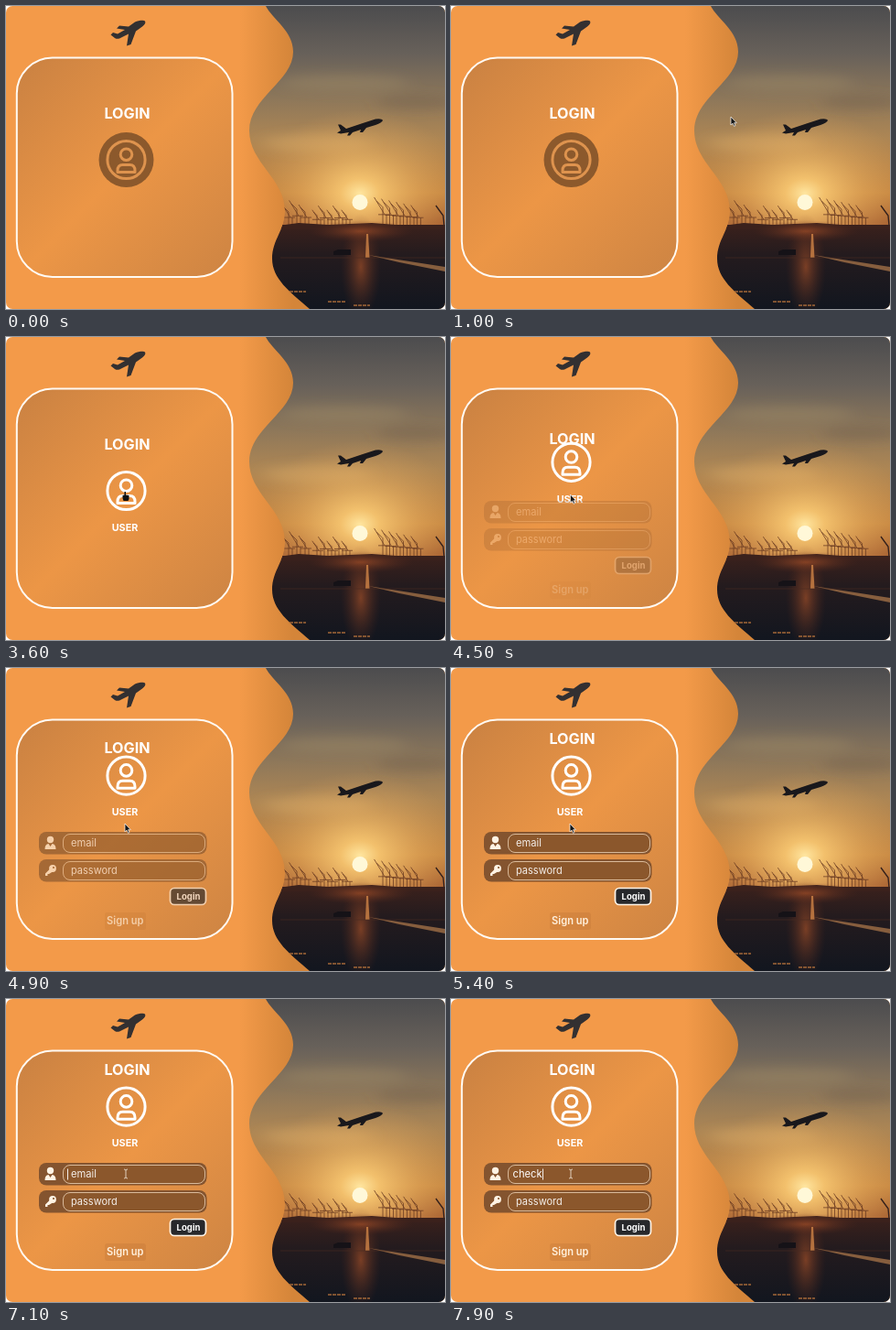
Animation of 480x331 px, one loop 8 s. Source, as an HTML page:

```html
<!DOCTYPE html>
<html lang="en">
<head>
<meta charset="utf-8">
<title>Login</title>
<style>
  html, body { margin: 0; width: 100%; height: 100%; overflow: hidden; background: #fff; }
  svg { display: block; width: 100vw; height: 100vh; }
  text { font-family: Inter, "Open Sans", sans-serif; fill: #fff; }
  .line { fill: none; stroke: currentColor; stroke-width: 3; }
</style>
</head>
<body>
<svg viewBox="0 0 480 331" xmlns="http://www.w3.org/2000/svg">
  <defs>
    <clipPath id="page"><rect width="480" height="331" rx="7"/></clipPath>
    <clipPath id="wave"><path d="M284 0C291 14 314 27 314 50C314 82 266 100 266 136C266 172 305 188 305 224C305 245 291 255 291 276C291 298 310 312 332 331H480V0Z"/></clipPath>
    <linearGradient id="panel" gradientUnits="userSpaceOnUse" x1="256" x2="314">
      <stop stop-color="#f39a49"/><stop offset="1" stop-color="#d48539"/>
    </linearGradient>
    <linearGradient id="card" x1="0" y1="0" x2="1" y2="1">
      <stop stop-color="#c98142"/><stop offset=".5" stop-color="#ec9646"/><stop offset="1" stop-color="#cd8443"/>
    </linearGradient>
    <linearGradient id="sky" x1="0" y1="0" x2="0" y2="1">
      <stop stop-color="#4c4c4e"/><stop offset=".22" stop-color="#68615a"/>
      <stop offset=".42" stop-color="#8d775a"/><stop offset=".6" stop-color="#ad8654"/>
      <stop offset=".85" stop-color="#c5853f"/><stop offset="1" stop-color="#a1592d"/>
    </linearGradient>
    <linearGradient id="ground" x1="0" y1="0" x2="0" y2="1">
      <stop stop-color="#3b211c"/><stop offset=".35" stop-color="#241b1e"/><stop offset="1" stop-color="#12161f"/>
    </linearGradient>
    <radialGradient id="glow">
      <stop stop-color="#ffe6a0"/><stop offset=".18" stop-color="#fbcb74" stop-opacity=".85"/>
      <stop offset=".55" stop-color="#edb463" stop-opacity=".45"/><stop offset="1" stop-color="#d8a05a" stop-opacity="0"/>
    </radialGradient>
    <radialGradient id="shine">
      <stop stop-color="#b6572a" stop-opacity=".8"/><stop offset="1" stop-color="#5c2a1c" stop-opacity="0"/>
    </radialGradient>
    <filter id="soft" x="-30%" y="-100%" width="160%" height="300%"><feGaussianBlur stdDeviation="9 6"/></filter>
  </defs>

  <g clip-path="url(#page)">
    <rect width="480" height="331" fill="url(#panel)"/>

    <g clip-path="url(#wave)">
      <rect x="260" width="220" height="240" fill="url(#sky)"/>
      <g filter="url(#soft)">
        <ellipse cx="370" cy="84" rx="70" ry="9" fill="#a18c69" opacity=".4"/>
        <ellipse cx="450" cy="105" rx="45" ry="9" fill="#6c5c49" opacity=".35"/>
        <ellipse cx="340" cy="150" rx="60" ry="10" fill="#d9ac68" opacity=".45"/>
      </g>
      <ellipse cx="387" cy="205" rx="118" ry="92" fill="url(#glow)"/>
      <circle cx="387" cy="214.500" r="8.500" fill="#fff8d8"/>
      <path id="cranes" fill="none" stroke="#6a3a22" stroke-width=".9" opacity=".85"/>
      <rect x="260" y="239" width="220" height="92" fill="url(#ground)"/>
      <path d="M290 241L320 237L352 239L400 237L440 240H480V244H290Z" fill="#3b211c"/>
      <ellipse cx="388" cy="246" rx="58" ry="12" fill="url(#shine)" opacity=".8"/>
      <ellipse cx="388" cy="285" rx="22" ry="58" fill="url(#shine)" opacity=".75"/>
      <path d="M470 218L478 229L479 240" fill="none" stroke="#35211c" stroke-width="1.400"/>
      <path d="M394 249H396L397.500 275H393Z" fill="#d98a48" opacity=".75"/>
      <path d="M396 272L480 285V290L430 280Z" fill="#a97549" opacity=".75"/>
      <path d="M300 275H480" stroke="#4a2d22" opacity=".6"/>
      <path d="M358 272V268L363 266H377V272Z" fill="#151217"/>
      <path d="M305 312H328M352 323H372M380 327H398" stroke="#b8743c" stroke-width="1.800" stroke-dasharray="4 1" opacity=".65"/>
      <path d="M363 129.500H366L372 134L390 128L404 123.500Q411 122.500 412 125Q411 127.500 404 130L394 133L390 138H387L388 135L379 138L376 141.500H373L375 138L366 139.500L362 138.500L366 136Z" fill="#19181c"/>
    </g>

    <path d="M152 16.500C151 15 145 15.500 141 17.500L134 22.500L124 21.500L121 24.500L130 26L122 30.500L117 29L114.500 31.500L119 35C120.500 36 122 36 124 35.500L134 30.500L132 43.500L136.500 42L142 27.500L149 22.500C152 20 153 18.500 152 16.500Z" fill="#333031"/>
    <rect x="11.800" y="56.600" width="235.700" height="239.400" rx="39" fill="url(#card)" stroke="#fffaf3" stroke-width="2"/>

    <text id="title" x="132.500" text-anchor="middle" font-size="16.200" font-weight="700">LOGIN</text>

    <g id="badge">
      <circle id="disc" r="30"/>
      <g id="person">
        <circle class="line" r="20.600"/>
        <circle class="line" cy="-5.800" r="6.300"/>
        <path class="line" stroke-linejoin="round" d="M-9.500 13.500V12Q-9.500 5.500-4 5.500H4Q9.500 5.500 9.500 12V13.500Z"/>
      </g>
      <text id="role" x="-1.500" y="43.800" text-anchor="middle" font-size="10.800" font-weight="700">USER</text>
    </g>

    <g id="form">
      <g id="rows"></g>
      <g fill="#fff3e4">
        <circle cx="48.500" cy="187.500" r="3.700"/>
        <path d="M42.500 198Q42.500 192.500 46.500 192L48.500 195L50.500 192Q54.500 192.500 54.500 198Z"/>
        <circle cx="51" cy="219" r="3.900"/>
        <path d="M48 219.500L51 222.500L47 225H45.500V227H43V224.500Z"/>
        <circle cx="52" cy="218" r="1.100" fill="#85562f"/>
      </g>
      <text id="email" y="195.300" font-size="11.200"></text>
      <text x="71" y="225.300" font-size="11" opacity=".9">password</text>
      <rect x="179.500" y="240.500" width="39" height="18" rx="4.500" fill="#27282b" stroke="#fff5e9" stroke-width="1.700"/>
      <text x="199.500" y="253" text-anchor="middle" font-size="9.600" font-weight="700">Login</text>
      <rect x="108" y="267" width="45" height="19" rx="3" fill="#9a5b25" opacity=".16"/>
      <text x="130.300" y="280.300" text-anchor="middle" font-size="11.100" font-weight="600" style="fill:#fff0dc">Sign up</text>
      <rect id="caret" y="185.500" width=".9" height="12" fill="#fff"/>
    </g>

    <g id="pointer">
      <path id="arrow" d="M0 0V9L2 7.200L3.500 10.300L5 9.600L3.600 6.700H6.300Z" fill="#151515" stroke="#fff" stroke-width=".7"/>
      <path id="hand" d="M-3.500-1L-1.500-1.500V-5H0V-1.500L3.500-1V3L2.500 5H-2.500L-3.500 2Z" fill="#111"/>
      <path id="beam" d="M-2-5Q0-5 0-3.500Q0-5 2-5M0-3.500V3.500M-2 5Q0 5 0 3.500Q0 5 2 5" fill="none" stroke="#eadccb" stroke-width=".9"/>
    </g>
  </g>
</svg>
<script>
const LOOP = 8000;
const $ = id => document.getElementById(id);
const set = (id, name, value) => $(id).setAttribute(name, value);
const show = (id, on) => set(id, 'visibility', on ? 'visible' : 'hidden');
const mix = (a, b, u) => a + (b - a) * u;
const blend = (a, b, u) => `rgb(${a.map((v, i) => mix(v, b[i], u))})`;
const ramp = (t, from, to) => Math.min(1, Math.max(0, (t - from) / (to - from)));
const ease = u => u < .5 ? 2 * u * u : 1 - 2 * (1 - u) * (1 - u);

// time, x, y
const route = [
  [500, 484, 62], [1000, 306, 121], [1600, 215, 165], [1900, 215, 165],
  [2200, 147, 183], [2700, 131, 174], [4200, 131, 174], [4800, 130, 170],
  [5750, 130, 170], [6100, 129, 191], [6600, 129, 191], [6900, 131, 191]
];
const strokes = [7150, 7350, 7550, 7750, 7900];
const word = 'check';

function buildRows() {
  $('rows').innerHTML = [179, 209].map(y => `
    <rect x="36" y="${y}" width="183.500" height="24.500" rx="8" fill="#84542f"/>
    <rect x="62.500" y="${y + 2.5}" width="155" height="20" rx="7.500"
      fill="#8b572c" stroke="#e2c6a8" stroke-width=".9"/>`).join('');
}

function buildCranes() {
  const crane = (x, h) => {
    const deck = 240 - h * .45;
    return `M${x} 240V${240 - h * .75}M${x + 4} 240V${deck}M${x - 5} ${deck}H${x + 7}` +
      `M${x + 2} ${deck}L${x - h * .35} ${240 - h * 1.15}M${x} ${240 - h * .75}L${x - h * .25} ${240 - h}`;
  };
  let d = '';
  for (let i = 0; i < 3; i++) d += crane(309 + i * 9, 20 + i % 2 * 4);
  for (let i = 0; i < 5; i++) d += crane(340 + i * 8, 15 + i % 2 * 4);
  for (let i = 0; i < 6; i++) d += crane(412 + i * 7.5, 27 - i * 1.5);
  set('cranes', 'd', d);
}

function pointerAt(t) {
  let i = 0;
  while (i < route.length - 2 && t > route[i + 1][0]) i++;
  const [a, b] = [route[i], route[i + 1]];
  const u = ease(ramp(t, a[0], b[0]));
  return [mix(a[1], b[1], u), mix(a[2], b[2], u)];
}

function drawPointer(t) {
  const [x, y] = pointerAt(t);
  set('pointer', 'transform', `translate(${x} ${y})`);
  const kind = t < 2050 ? 'arrow' : t < 2500 ? 'beam' : t < 4300 ? 'hand' : t < 6000 ? 'arrow' : 'beam';
  for (const id of ['arrow', 'hand', 'beam']) show(id, id === kind && t >= 500);
}

function drawBadge(t) {
  const dim = ramp(t, 1950, 2200);
  const white = ramp(t, 2200, 2680);
  const tan = [mix(222, 192, dim), mix(147, 132, dim), mix(78, 80, dim)];
  set('disc', 'fill', blend([140, 89, 44], [143, 95, 54], dim));
  set('disc', 'opacity', 1 - white);
  set('person', 'color', blend(tan, [255, 255, 255], white));
  set('role', 'opacity', ramp(t, 2300, 2700));
  set('badge', 'transform', `translate(131.5 ${mix(168, 117.7, ease(ramp(t, 4050, 4850)))})`);
}

function drawForm(t) {
  set('title', 'y', mix(123.3, 82.8, ease(ramp(t, 4200, 5300))));
  set('form', 'opacity', ramp(t, 4300, 5220));

  const typed = word.slice(0, strokes.filter(s => t >= s).length);
  const email = $('email');
  email.textContent = typed || 'email';
  set('email', 'x', typed ? 67.5 : 71);
  set('email', 'opacity', typed ? 1 : .9);
  set('caret', 'x', typed ? 68 + email.getComputedTextLength() : 67);
  show('caret', typed || t >= 6100 && (t - 6100) % 1000 < 500);
}

function draw(t) {
  drawBadge(t);
  drawForm(t);
  drawPointer(t);
}

buildRows();
buildCranes();
draw(0);
const start = performance.now();
(function tick() {
  draw((performance.now() - start) % LOOP);
  requestAnimationFrame(tick);
})();
</script>
</body>
</html>
```
